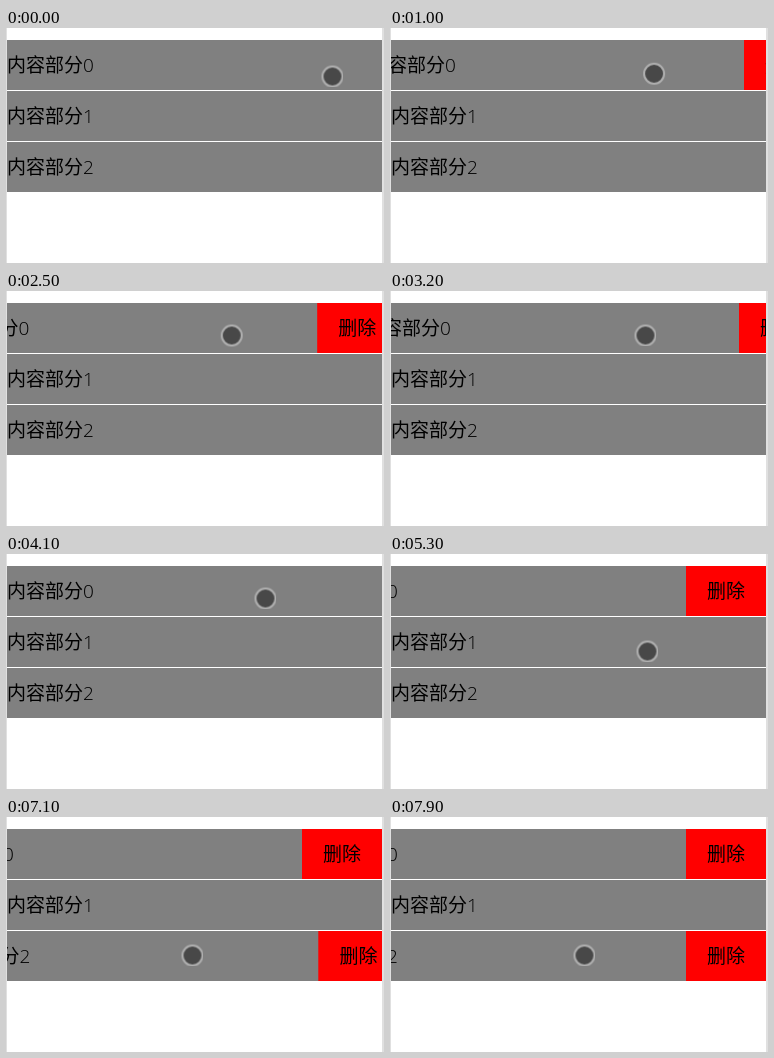
These frames come from a looping animation (378x235 px, 8 s). An HTML page:

```html
<!DOCTYPE html>
<html lang="zh-CN">
<head>
<meta charset="utf-8">
<title>左滑删除</title>
<style>
  html, body {
    margin: 0;
    width: 100%;
    height: 100%;
    overflow: hidden;
    background: #fff;
  }
  .phone {
    position: absolute;
    left: 0;
    top: 0;
    width: 375px;
    height: 235px;
    border: solid #e0e0e0;
    border-width: 0 2px 0 1px;
    overflow: hidden;
    font: 350 19px/50px "Open Sans", "Noto Sans CJK SC", "Noto Sans CJK", sans-serif;
    color: #000;
  }
  ul {
    margin: 12px 0 0;
    padding: 0;
    list-style: none;
  }
  li {
    display: flex;
    width: 455px;
    height: 50px;
    margin-bottom: 1px;
    white-space: nowrap;
  }
  .text {
    width: 375px;
    background: #808080;
  }
  .delete {
    width: 80px;
    background: #f00;
    text-align: center;
  }
  .touch {
    position: absolute;
    left: -11.5px;
    top: -11.5px;
    box-sizing: border-box;
    width: 22px;
    height: 22px;
    border: 2px solid #b0b0b0;
    border-radius: 50%;
    background: #484848;
  }
  /* The motion is sampled ten times a second; the small delay keeps samples off the step edges. */
  .first, .third, .touch {
    animation: 8s -10ms step-end infinite;
  }
  .first { animation-name: swipe-first; }
  .third { animation-name: swipe-third; }
  .touch { animation-name: finger; }

  @keyframes swipe-first {
    0% { transform: translateX(0); }
    5% { transform: translateX(0); animation-timing-function: steps(15); }
    23.75% { transform: translateX(-55px); animation-timing-function: steps(5); }
    30% { transform: translateX(-70px); animation-timing-function: steps(8); }
    40% { transform: translateX(-27px); animation-timing-function: steps(3); }
    43.75% { transform: translateX(0); }
    51.25% { transform: translateX(0); animation-timing-function: steps(3); }
    55% { transform: translateX(-33px); animation-timing-function: steps(2); }
    57.5%, 100% { transform: translateX(-80px); }
  }
  @keyframes swipe-third {
    0% { transform: translateX(0); }
    82.5% { transform: translateX(0); animation-timing-function: steps(4); }
    87.5% { transform: translateX(-47px); animation-timing-function: steps(2); }
    90%, 100% { transform: translateX(-80px); }
  }
  @keyframes finger {
    0% { transform: translate(326.5px, 48.5px); animation-timing-function: steps(3); }
    3.75% { transform: translate(282.5px, 46.5px); }
    5% { transform: translate(282.5px, 46.5px); animation-timing-function: steps(15); }
    23.75% { transform: translate(236.5px, 44.5px); animation-timing-function: steps(5); }
    30% { transform: translate(221.5px, 44.5px); animation-timing-function: steps(8); }
    40% { transform: translate(255.5px, 44.5px); animation-timing-function: steps(3); }
    43.75% { transform: translate(271.5px, 45.5px); }
    45% { transform: translate(271.5px, 45.5px); animation-timing-function: steps(3); }
    48.75% { transform: translate(255.5px, 44.5px); }
    51.25% { transform: translate(259.5px, 44.5px); animation-timing-function: steps(3); }
    55% { transform: translate(226.5px, 43.5px); }
    60% { transform: translate(226.5px, 43.5px); animation-timing-function: steps(3); }
    63.75% { transform: translate(257.5px, 99.5px); }
    66.25% { transform: translate(257.5px, 97.5px); }
    71.25% { transform: translate(257.5px, 97.5px); animation-timing-function: steps(3); }
    75% { transform: translate(250.5px, 138.5px); }
    82.5% { transform: translate(233.5px, 138.5px); animation-timing-function: steps(4); }
    87.5% { transform: translate(186.5px, 138.5px); }
    96.25% { transform: translate(186.5px, 138.5px); animation-timing-function: steps(2); }
    98.75%, 100% { transform: translate(194.5px, 138.5px); }
  }
</style>
</head>
<body>
<div class="phone">
  <ul>
    <li class="first"><div class="text">内容部分0</div><div class="delete">删除</div></li>
    <li><div class="text">内容部分1</div><div class="delete">删除</div></li>
    <li class="third"><div class="text">内容部分2</div><div class="delete">删除</div></li>
  </ul>
</div>
<div class="touch"></div>
</body>
</html>
```
